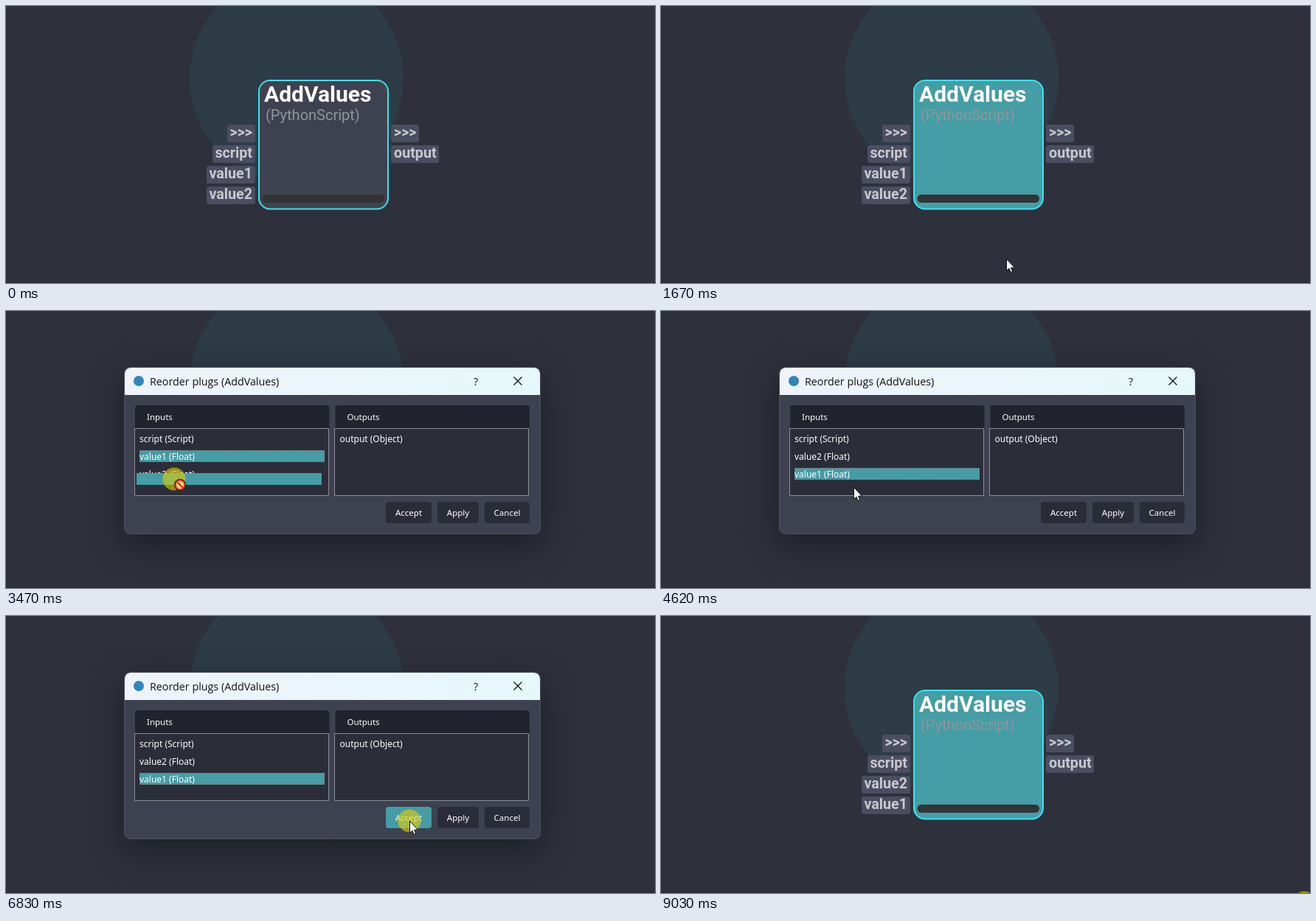
These frames come from a looping animation (880 px wide and 376 px high, 9.16 s). An HTML page with a canvas:

```html
<!DOCTYPE html>
<html lang="en">
<head>
<meta charset="utf-8">
<title>Reorder plugs</title>
<style>
  html, body { margin: 0; width: 880px; height: 376px; overflow: hidden; background: #2e313c; }
  canvas { display: block; }
</style>
</head>
<body>
<canvas id="stage" width="880" height="376"></canvas>
<script>
const ctx = document.getElementById('stage').getContext('2d');
const LOOP = 9160;
const TEAL = '#459da5', HOVER = '#357a7f', INK = '#111';
const SMALL = '500 11.5px "Noto Sans", sans-serif';
const BODY = '500 12px "Noto Sans", sans-serif';
const TITLE = '14.3px "Open Sans", sans-serif';
const NODE = 'Roboto, sans-serif';

// Moments of the story, in ms
const T = { enter: 130, hover: 330, select: 740, menu: 1740, open: 1940, press: 2930, drag: 3000,
            allow: 3600, drop: 4140, accept: 6830, close: 6900, closed: 7020, leave: 8570, stop: 9030 };

// Pointer trips: each eases out from wherever the last one ended
const START = { x: 559, y: 289 };
const GRAB = { x: 232, y: 197 };
const trips = [
  { from: T.enter, to: 520, x: 500, y: 240 },
  { from: 670, to: 1200, x: 468, y: 343 },
  { from: T.open, to: 2330, x: 285, y: 218 },
  { from: 2340, to: 2670, ...GRAB },
  { from: T.drag, to: 3740, x: 227, y: 233 },
  { from: 4550, to: 5420, x: 442, y: 274 },
  { from: 5940, to: 6500, x: 547, y: 278 },
  { from: 8280, to: T.leave, x: 785, y: 297 }
];

const between = (t, a, b) => t >= a && t < b;
const progress = (t, a, b) => Math.max(0, Math.min(1, (t - a) / (b - a)));
const easeOut = k => 1 - (1 - k) ** 2;
const inside = (p, x, y, w, h) => between(p.x, x, x + w) && between(p.y, y, y + h);

function pointerAt(t) {
  const { x, y } = trips.reduce((p, trip) => {
    const k = easeOut(progress(t, trip.from, trip.to));
    return { x: p.x + (trip.x - p.x) * k, y: p.y + (trip.y - p.y) * k };
  }, START);
  return { x: Math.round(x), y: Math.round(y) };
}

function box(x, y, w, h, r, fill, stroke, line = 1) {
  ctx.beginPath();
  ctx.roundRect(x, y, w, h, r);
  if (fill) { ctx.fillStyle = fill; ctx.fill(); }
  if (stroke) { ctx.strokeStyle = stroke; ctx.lineWidth = line; ctx.stroke(); }
}

function dashedBox(x, y, w, h, color, dash) {
  ctx.setLineDash([dash, dash]);
  box(x, y, w, h, 0, null, color);
  ctx.setLineDash([]);
}

function disc(x, y, r, fill) {
  box(x - r, y - r, 2 * r, 2 * r, r, fill);
}

function text(str, x, y, font, color = '#fff', align = 'left') {
  ctx.font = font;
  ctx.fillStyle = color;
  ctx.textAlign = align;
  ctx.fillText(str, x, y);
}

// Diagonal stroke through a centre; slope is 1 or -1
function diagonal(cx, cy, r, slope, color, width) {
  ctx.beginPath();
  ctx.moveTo(cx - r, cy - r * slope);
  ctx.lineTo(cx + r, cy + r * slope);
  ctx.strokeStyle = color;
  ctx.lineWidth = width;
  ctx.stroke();
}

function drawBackground() {
  box(0, 0, 880, 376, 0, '#2e313c');
  disc(394, 98, 145, '#2d3c47');
  box(0, 375, 880, 1, 0, '#292c36');
}

function drawPlugs(names, isInput) {
  names.forEach((name, i) => {
    const y = 161 + 28 * i;
    ctx.font = `bold 19.7px ${NODE}`;
    const width = Math.round(ctx.measureText(name).width) + 7;
    box(isInput ? 338 - width : 522, y, width, 24, 3, '#4b4d61');
    text(name, isInput ? 334 : 526, y + 17, ctx.font, '#c8c9cd', isInput ? 'right' : 'left');
  });
}

function drawNode(t) {
  const fill = t < T.hover ? '#3e4250' : t < T.select ? '#4d5261' : TEAL;
  box(343, 101, 175, 174.5, 15, fill, '#3be3ef', 2);
  text('AddValues', 350, 130, `bold 30px ${NODE}`);
  text('(PythonScript)', 352, 155, `20px ${NODE}`, '#93949b');
  box(347.5, 256, 165.5, 11, 5.5, '#333436');
  const values = t < T.close ? ['value1', 'value2'] : ['value2', 'value1'];
  drawPlugs(['>>>', 'script', ...values], true);
  drawPlugs(['>>>', 'output'], false);
}

function drawList(x, title, rows, pointer, selected = -1) {
  box(x, 128, 263.5, 32, [4, 4, 0, 0], '#21242e');
  text(title, x + 16, 148, SMALL);
  box(Math.floor(x) - .5, 159.5, 263, 91, 0, '#2b2e39', '#8b8e96');
  rows.forEach((name, i) => {
    const row = [x + 6, 165 + 24 * i, 251, 16];
    if (i === selected) {
      box(...row, 0, TEAL);
      dashedBox(row[0] + .5, row[1] + .5, 250, 15, '#947370', 3);
    } else if (inside(pointer, ...row)) {
      box(...row, 0, HOVER);
    }
    text(name, x + 6, row[1] + 13, BODY);
  });
}

function drawButton(name, x, width, pointer, pressed) {
  const area = [x, 259, width, 29];
  const hovered = inside(pointer, ...area);
  box(...area, 4, !hovered ? '#2a2d37' : pressed ? TEAL : HOVER);
  text(name, x + width / 2, 278, SMALL, '#fff', 'center');
}

function drawDialog(t, pointer) {
  const frame = [160.5, 76.5, 564, 226, 8];
  ctx.save();
  ctx.globalAlpha = progress(t, T.open, T.open + 130) * (1 - progress(t, T.close, T.closed));

  ctx.save();
  ctx.shadowColor = 'rgba(0,0,0,.4)';
  ctx.shadowBlur = 48;
  ctx.shadowOffsetY = 14;
  box(...frame, '#3d4150');
  ctx.restore();

  const bar = ctx.createLinearGradient(161, 0, 724, 0);
  bar.addColorStop(0, '#eff3fc');
  bar.addColorStop(1, '#e5f8f8');
  box(161, 77, 563, 37, [8, 8, 0, 0], bar);
  box(...frame, null, '#50535e');
  disc(180, 95, 7, '#2f86bd');
  text('Reorder plugs (AddValues)', 195, 101, TITLE, INK);
  text('?', 637, 101, TITLE, INK, 'center');
  for (const slope of [1, -1]) diagonal(694, 95, 5.5, slope, INK, 1.2);

  const dragging = between(t, T.press, T.drop);
  const dropped = t >= T.drop;
  const values = ['value1 (Float)', 'value2 (Float)'];
  if (dropped) values.reverse();
  const hoverPoint = dragging ? {} : pointer;
  drawList(175, 'Inputs', ['script (Script)', ...values], hoverPoint, dropped ? 2 : dragging ? 1 : -1);
  drawList(446.5, 'Outputs', ['output (Object)'], hoverPoint);

  const pressed = t >= T.accept;
  drawButton('Accept', 515, 62, pointer, pressed);
  drawButton('Apply', 585, 56, pointer, pressed);
  drawButton('Cancel', 649, 61, pointer, pressed);

  if (between(t, T.drag, T.drop)) {
    box(181 + pointer.x - GRAB.x, 189 + pointer.y - GRAB.y, 251, 16, 0, TEAL);
  }
  ctx.restore();
}

const arrow = new Path2D('M.5 .5V16.5L4 13.2 6.3 18.4 8.7 17.4 6.5 12.3 11.3 12Z');

function drawArrow({ x, y }) {
  ctx.save();
  ctx.translate(x, y);
  ctx.fillStyle = '#fff';
  ctx.fill(arrow);
  ctx.strokeStyle = INK;
  ctx.lineWidth = 1;
  ctx.stroke(arrow);
  ctx.restore();
}

function drawForbidden({ x, y }) {
  const cx = x + 8, cy = y + 8;
  disc(cx, cy, 8, '#3a1510');
  disc(cx, cy, 7.2, '#d8321c');
  disc(cx, cy, 5.4, '#f5cf85');
  diagonal(cx, cy, 4, 1, '#d8321c', 2.2);
}

function drawPointer(t, pointer) {
  const glow = (x, y) => disc(x, y, 15.5, 'rgba(222,205,10,.62)');
  if (t >= T.stop) glow(872, 389);
  if (!between(t, T.enter, T.leave)) return;

  const clicking = [T.select, T.menu, T.accept].some(click => between(t, click, click + 70));
  if (clicking || between(t, T.press, T.drop)) glow(pointer.x, pointer.y);
  if (between(t, T.drag, T.allow)) return drawForbidden(pointer);
  drawArrow(pointer);
  if (between(t, T.allow, T.drop)) dashedBox(pointer.x + 4.5, pointer.y + 20.5, 17, 8, '#ddd', 1);
}

const start = performance.now();
function tick() {
  const t = (performance.now() - start) % LOOP;
  const pointer = pointerAt(t);
  drawBackground();
  drawNode(t);
  if (between(t, T.open, T.closed)) drawDialog(t, pointer);
  drawPointer(t, pointer);
  requestAnimationFrame(tick);
}
tick();
</script>
</body>
</html>
```
